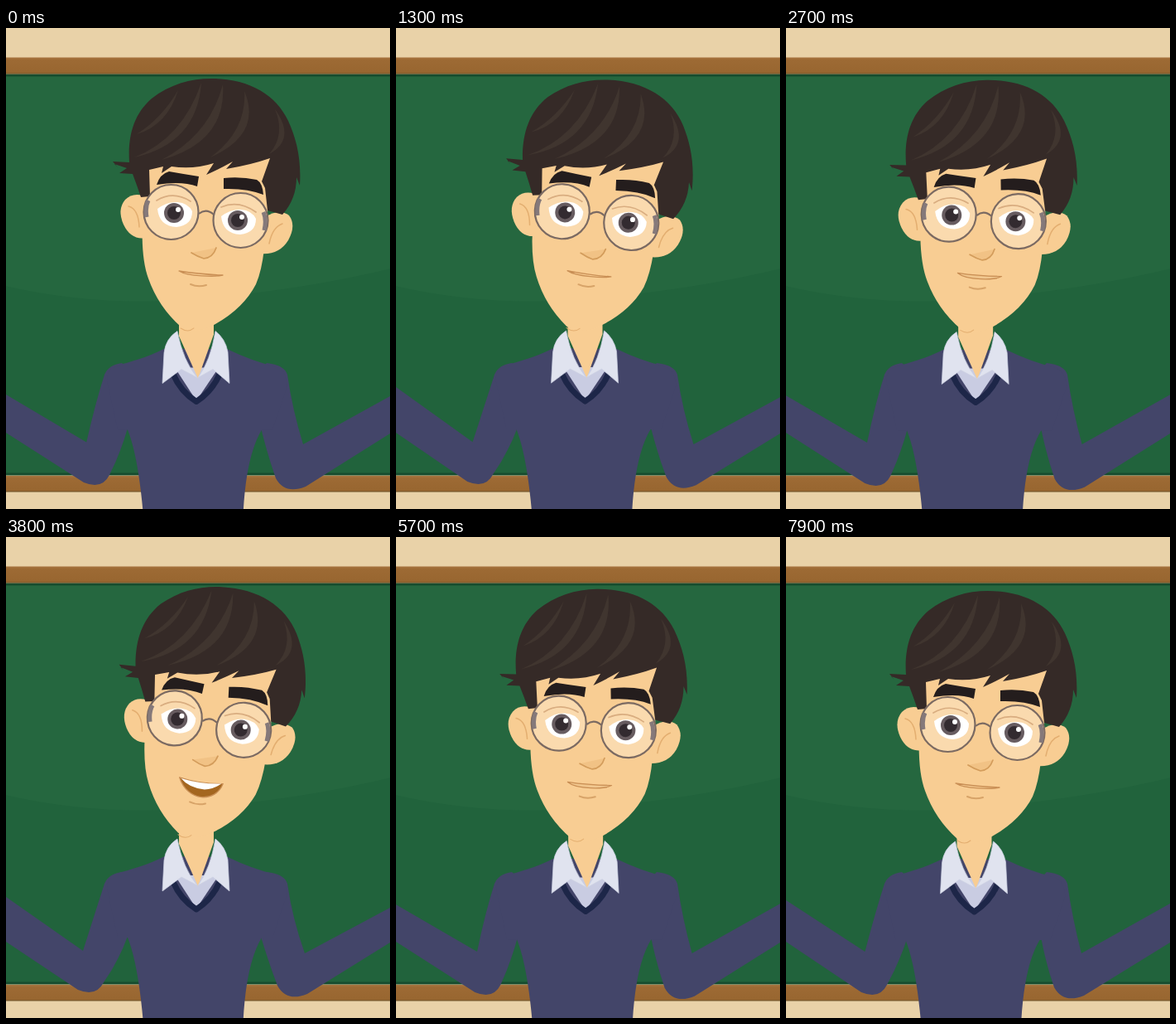
An HTML page for the animation above (8 s loop, 464 px wide and 580 px high).

```html
<!DOCTYPE html>
<html lang="en">
<head>
<meta charset="utf-8">
<title>Teacher at the chalkboard</title>
<style>
  html, body { margin: 0; width: 100%; height: 100%; overflow: hidden; background: #e9d2a8; }
  svg { display: block; width: 100vw; height: 100vh; }
  .scene { filter: blur(.6px); }
  .line { fill: none; stroke-linecap: round; stroke-linejoin: round; }
</style>
</head>
<body>
<svg viewBox="0 0 464 580">
  <defs>
    <linearGradient id="wood" x2="0" y2="1">
      <stop offset="0" stop-color="#a77540"/><stop offset=".15" stop-color="#9d6a34"/>
      <stop offset=".9" stop-color="#986630"/><stop offset="1" stop-color="#6b5329"/>
    </linearGradient>
  </defs>

  <g class="scene">
  <rect x="-9" y="-9" width="482" height="600" fill="#e9d2a8"/>
  <rect x="-9" y="56" width="482" height="483" fill="#25673f"/>
  <path d="M-9 309Q110 338 240 326T473 288V539H-9Z" fill="#21633c"/>
  <path d="M-9 57H473M-9 538H473" stroke="#174c2e" stroke-width="3"/>
  <rect x="-9" y="35.5" width="482" height="20" fill="url(#wood)"/>
  <rect x="-9" y="540" width="482" height="19.5" fill="url(#wood)"/>

  <g fill="#434569">
    <path id="leftArm"/>
    <path id="rightArm"/>
  </g>
  <g id="body">
    <path fill="#434569" d="M192 385C170 396 150 401 133 406Q122 409 122 424L135 483H147Q161 518 167 600H286Q288 518 309 483H322L340 430Q338 410 326 407Q297 400 268 386Z"/>
    <path fill="#c9cce2" d="M204 408L230 448L257 408Z"/>
    <path class="line" stroke="#1d2648" stroke-width="7" style="stroke-linecap:butt" d="M202 416Q211 437 230 449Q249 437 258 416"/>
    <path fill="#f8cd93" d="M209 345H251V368L232 421L209 370Z"/>
    <g fill="#e0e3ef" stroke="#cdd1e2" stroke-width=".7">
      <path d="M207 364Q193 373 191 390L189 427L212 410L231 420Q214 400 207 364Z"/>
      <path d="M253 364Q265 373 268 389L270 427L250 410L232 420Q247 400 253 364Z"/>
    </g>
  </g>

  <g id="head">
    <g fill="#f8cd93">
      <path d="M169 209Q151 200 140 211Q130 223 138 241Q147 260 165 257Z"/>
      <path d="M309 232Q326 221 338 230Q347 242 337 260Q326 278 303 276Z"/>
      <path d="M166 165L161 235Q159 282 168 306Q180 340 207 364Q228 374 249 361Q283 342 298 313Q305 297 308 270L318 160L250 120Z"/>
    </g>
    <g class="line" stroke="#e3ae70" stroke-width="1.5">
      <path d="M144 219Q156 222 157 244M330 240Q318 244 314 264"/>
      <path d="M207 366Q216 372 223 366" stroke-width="1"/>
    </g>

    <path fill="#352a27" d="M127 168L131 172L125 165L145 166C143 135 150 108 172 89C194 72 219 65 244 65C289 65 322 84 337 116C347 138 353 162 351 194L347 184Q347 210 330 229L312 224L309 197L305 189L315 161Q292 169 262 174L270 165Q254 174 238 181L247 167Q222 175 196 171L184 179L186 171L169 175L170 207L159 208Q154 193 149 180L133 179L142 173Z"/>
    <g fill="#40352f">
      <path d="M151 160Q209 137 232 70Q227 143 151 160Z"/>
      <path d="M184 163Q242 133 258 72Q263 141 184 163Z"/>
      <path d="M243 160Q287 128 284 80Q306 132 243 160Z"/>
      <path d="M154 132Q184 113 204 79Q191 121 154 132Z"/>
      <path d="M314 156Q334 133 321 102Q347 138 314 156Z"/>
    </g>

    <g fill="#241d1d">
      <path d="M178 193Q182 180 193 177Q210 180 229 183L227 195Q208 188 178 193Z"/>
      <path d="M259 185Q280 183 299 187Q306 191 307 205Q287 197 259 198Z"/>
    </g>

    <g fill="#fff" fill-opacity=".25" stroke="#7b6a62" stroke-width="2.2">
      <circle cx="195.5" cy="226" r="33"/>
      <circle cx="279.5" cy="236" r="33"/>
      <path fill="none" d="M229 228Q238 221 247 229"/>
    </g>
    <path class="line" stroke="#85797a" stroke-width="5" style="stroke-linecap:butt" d="M168 212Q164 220 166 232M307 226Q311 235 308 248"/>

    <g id="eyes"></g>
    <path class="line" stroke="#d9ad80" stroke-width="1.7" d="M178 212Q198 200 219 213M256 220Q277 211 298 226"/>

    <path class="line" stroke="#d39c5b" stroke-width="1.7" fill="#edbb7d" d="M220 275Q228 280 235 282Q246 281 250 269" style="fill:#f1c285"/>

    <path id="mouth" fill="#a4661f" stroke="#c98f55" stroke-width="1.3" stroke-linejoin="round"/>
    <path id="teeth" fill="#fff"/>
    <path id="chin" class="line" stroke="#d7a368" stroke-width="2" d="M219 313Q228 317 238 314"/>
  </g>
  </g>
</svg>
<script>
const TAU = 2 * Math.PI, LOOP = 8000, SWAY = 3000;
const $ = id => document.getElementById(id);
const set = (id, name, value) => $(id).setAttribute(name, value);

// Each eye: white with a drooping lid, iris, pupil, highlight
$("eyes").innerHTML = [[199, 227], [276, 236]].map(([x, y]) => `
  <g transform="translate(${x} ${y})">
    <path fill="#fff" d="M-20 -5Q-8 -14 4 -13Q17 -12 22 -2Q22 15 3 17Q-18 16 -20 -5Z"/>
    <circle r="12" fill="#675c60"/>
    <circle r="8" fill="#332b30"/>
    <circle cx="5" cy="-4" r="3" fill="#fff"/>
  </g>`).join("");

// Smooth periodic curve through three poses of the sway
const poses = [0, 800, 1900].map(t => t / SWAY * TAU);
function weights(t) {
  const a = t / SWAY * TAU;
  return poses.map((p, i) => poses.reduce((w, q, j) =>
    i === j ? w : w * Math.sin((a - q) / 2) / Math.sin((p - q) / 2), 1));
}

function draw(t) {
  const w = weights(t);
  const mix = (...v) => v.reduce((sum, x, i) => sum + x * w[i], 0);

  set("head", "transform",
    `translate(${mix(4, 1, 0)} ${mix(-4, -6, 0)}) rotate(${mix(0, 3, 0)} 230 365)`);
  set("body", "transform", `translate(${mix(0, 0, -2.5)} ${mix(1.5, 0, 3)})`);

  const lx = mix(7, 0, 4), ly = mix(2, 0, 3), lh = mix(442, 434, 438);
  set("leftArm", "d", `M140 404Q124 406 119 418Q108 452 ${93 + lx * .6} ${499 + ly * .3}
    L0 ${lh}L-8 ${lh - 5}V484L0 488L${87 + lx} ${546 + ly}
    Q${109 + lx} ${555 + ly} ${118 + lx} ${537 + ly}Q${136 + lx * .4} 512 148 479L170 430Z`);

  const rx = mix(-2, 0, -4), ry = mix(2, 0, 2), rh = mix(444, 447, 442);
  set("rightArm", "d", `M315 404Q336 406 340 418Q346 460 ${361 + rx} 502
    L464 ${rh}L472 ${rh - 5}V485L464 489L${364 + rx} ${551 + ry}
    Q${339 + rx} ${561 + ry} ${328 + rx} ${541 + ry}Q${318 + rx} 515 308 482L290 430Z`);

  const swing = Math.sin((t - 475) / 1500 * TAU);
  const open = Math.min(1, Math.max(0, swing * 1.1));
  const drop = 304 + 22 * open;
  set("mouth", "d", `M205 297Q${230 + open} ${301 + open * 3} 258 302C250 ${drop} 216 ${drop} 205 297Z`);
  set("mouth", "fill-opacity", open);
  set("teeth", "d", `M207 298Q231 304 256 302Q${250 - open * 3} ${303 + open * 6} 236 ${303 + open * 7}Q217 ${301 + open * 8} 207 298Z`);
  set("teeth", "opacity", open);
  set("chin", "transform", `translate(0 ${open * 13})`);
}

function tick(now) {
  draw(now % LOOP);
  requestAnimationFrame(tick);
}
draw(0);
requestAnimationFrame(tick);
</script>
</body>
</html>
```
